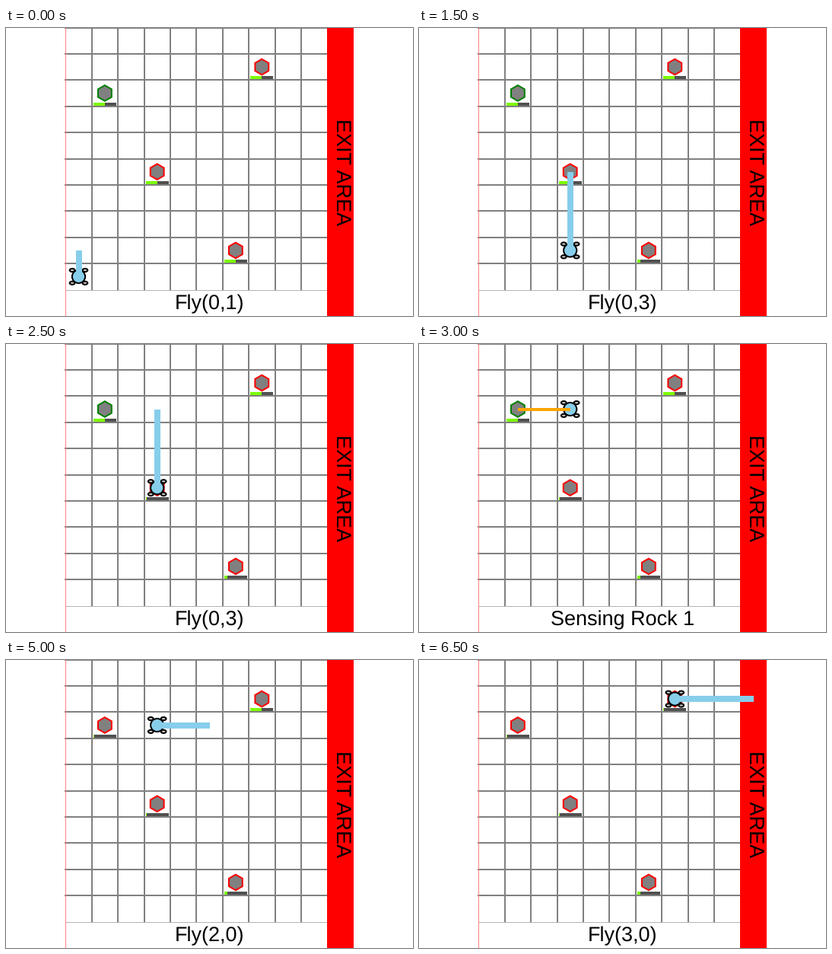
These frames come from a looping animation (535x378 px, 7000 ms). A matplotlib script:

```python
import matplotlib.pyplot as plt
from matplotlib.animation import FuncAnimation
from matplotlib.patches import Circle, Ellipse, Rectangle, RegularPolygon

W, H, DPI = 535, 378, 100
CELL, LEFT, BOTTOM = 34.4, 78.3, 343.5
SKY, GRAY = "#87ceeb", "#808080"
STEP_MS = 500

plt.rcParams["font.family"] = "Liberation Sans"
plt.rcParams["text.hinting"] = "none"
plt.rcParams["text.hinting_factor"] = 1

ROCKS = {1: (1, 7), 2: (3, 4), 3: (6, 1), 4: (7, 8)}

# Each step: drone cell, action, argument (move vector or rock number)
STEPS = [
    ((0, 0), "fly", (0, 1)),
    ((0, 1), "fly", (3, 0)),
    ((3, 1), "sense", 3),
    ((3, 1), "fly", (0, 3)),
    ((3, 4), "sense", 2),
    ((3, 4), "fly", (0, 3)),
    ((3, 7), "sense", 1),
    ((3, 7), "fly", (-2, 0)),
    ((1, 7), "sample", 1),
    ((1, 7), "fly", (2, 0)),
    ((3, 7), "fly", (2, 0)),
    ((5, 7), "fly", (2, 1)),
    ((7, 8), "sense", 4),
    ((7, 8), "fly", (3, 0)),
]

# Belief in each rock after it has been sensed
SENSED = {1: 0.97, 2: 0.03, 3: 0.12, 4: 0.03}


def px(n):
    """Pixels to points."""
    return n * 72 / DPI


def center(cell):
    return LEFT + (cell[0] + 0.5) * CELL, BOTTOM - (cell[1] + 0.5) * CELL


def rock_state(step):
    belief = {k: 0.5 for k in ROCKS}
    good = {k: k == 1 for k in ROCKS}
    for _, action, arg in STEPS[:step]:
        if action == "sense":
            belief[arg] = SENSED[arg]
        elif action == "sample":
            belief[arg], good[arg] = 0.05, False
    return belief, good


fig = plt.figure(figsize=(W / DPI, H / DPI), dpi=DPI, facecolor="white")
ax = fig.add_axes([0, 0, 1, 1])
ax.set_xlim(0, W)
ax.set_ylim(H, 0)
ax.axis("off")


def line(p, q, color, width, z):
    return ax.plot([p[0], q[0]], [p[1], q[1]], color=color, lw=px(width),
                   solid_capstyle="butt", zorder=z)[0]


def box(x, y, w, h, color, z):
    return ax.add_patch(Rectangle((x, y), w, h, fc=color, ec="none", zorder=z))


# Board
right = LEFT + 10 * CELL
for i in range(11):
    x, y = LEFT + i * CELL, BOTTOM - i * CELL
    if 0 < i < 10:
        line((x, 0), (x, BOTTOM), GRAY, 2, 1)
    if i:
        line((LEFT - 1, y), (right, y), GRAY, 2, 1)
line((LEFT, BOTTOM), (right, BOTTOM), "#b4b4b4", 1, 1)
box(78, 0, 1, H, "#ff8080", 2)
box(422, 0, 35, H, "red", 2)
ax.text(433.6, 188.7, "EXIT AREA", size=px(26.67), rotation=-90, ha="center",
        va="baseline", rotation_mode="anchor", zorder=3)

# Rocks and belief bars
hexes, bars = {}, {}
for k, cell in ROCKS.items():
    x, y = center(cell)
    hexes[k] = ax.add_patch(RegularPolygon((x, y), 6, radius=10.3, fc=GRAY,
                                           lw=px(2), zorder=4))
    box(x - 15, y + 12, 30, 4, "#505050", 5)
    bars[k] = box(x - 15, y + 12, 15, 4, "#7cfc00", 6)

# Drone
SIGNS = [(-1, -1), (1, -1), (-1, 1), (1, 1)]
ARM = 8.4
arms = [line((0, 0), (0, 0), "black", 2, 7) for _ in SIGNS]
rotors = [ax.add_patch(Ellipse((0, 0), 6.8, 4.2, fc="#c8c8c8", ec="black",
                               lw=px(2), zorder=8)) for _ in SIGNS]
body = ax.add_patch(Circle((0, 0), 8.6, fc=SKY, ec="black", lw=px(2), zorder=9))
ring = ax.add_patch(Circle((0, 0), 5.2, fc="none", ec="#3c8c50", lw=px(1.6),
                           zorder=10))
dot = ax.add_patch(Circle((0, 0), 2.3, fc="green", ec="none", zorder=10))
beam = line((0, 0), (0, 0), SKY, 8, 11)
ray = line((0, 0), (0, 0), "orange", 4, 11)

label = ax.text(267.3, 369.4, "", size=px(26.67), ha="center", va="baseline",
                zorder=12)


def draw(step):
    cell, action, arg = STEPS[step]
    x, y = center(cell)

    belief, good = rock_state(step)
    for k in ROCKS:
        hexes[k].set_edgecolor("green" if good[k] else "red")
        bars[k].set_width(30 * belief[k])

    for (sx, sy), arm, rotor in zip(SIGNS, arms, rotors):
        tip = x + sx * ARM, y + sy * ARM
        arm.set_data([x, tip[0]], [y, tip[1]])
        rotor.set_center(tip)
    for part in (body, ring, dot):
        part.set_center((x, y))

    target = cell
    if action == "fly":
        target = cell[0] + arg[0], cell[1] + arg[1]
        label.set_text("Fly(%d,%d)" % arg)
    elif action == "sense":
        target = ROCKS[arg]
        label.set_text("Sensing Rock %d" % arg)
    else:
        label.set_text("Sample")

    tx, ty = center(target)
    for item, name in ((beam, "fly"), (ray, "sense")):
        item.set_data([x, tx], [y, ty])
        item.set_visible(action == name and target != cell)
    ring.set_visible(action == "sample")
    dot.set_visible(action == "sample")
    return []


anim = FuncAnimation(fig, draw, frames=len(STEPS), interval=STEP_MS,
                     init_func=lambda: draw(0), repeat=True, repeat_delay=0)
plt.show()
```
